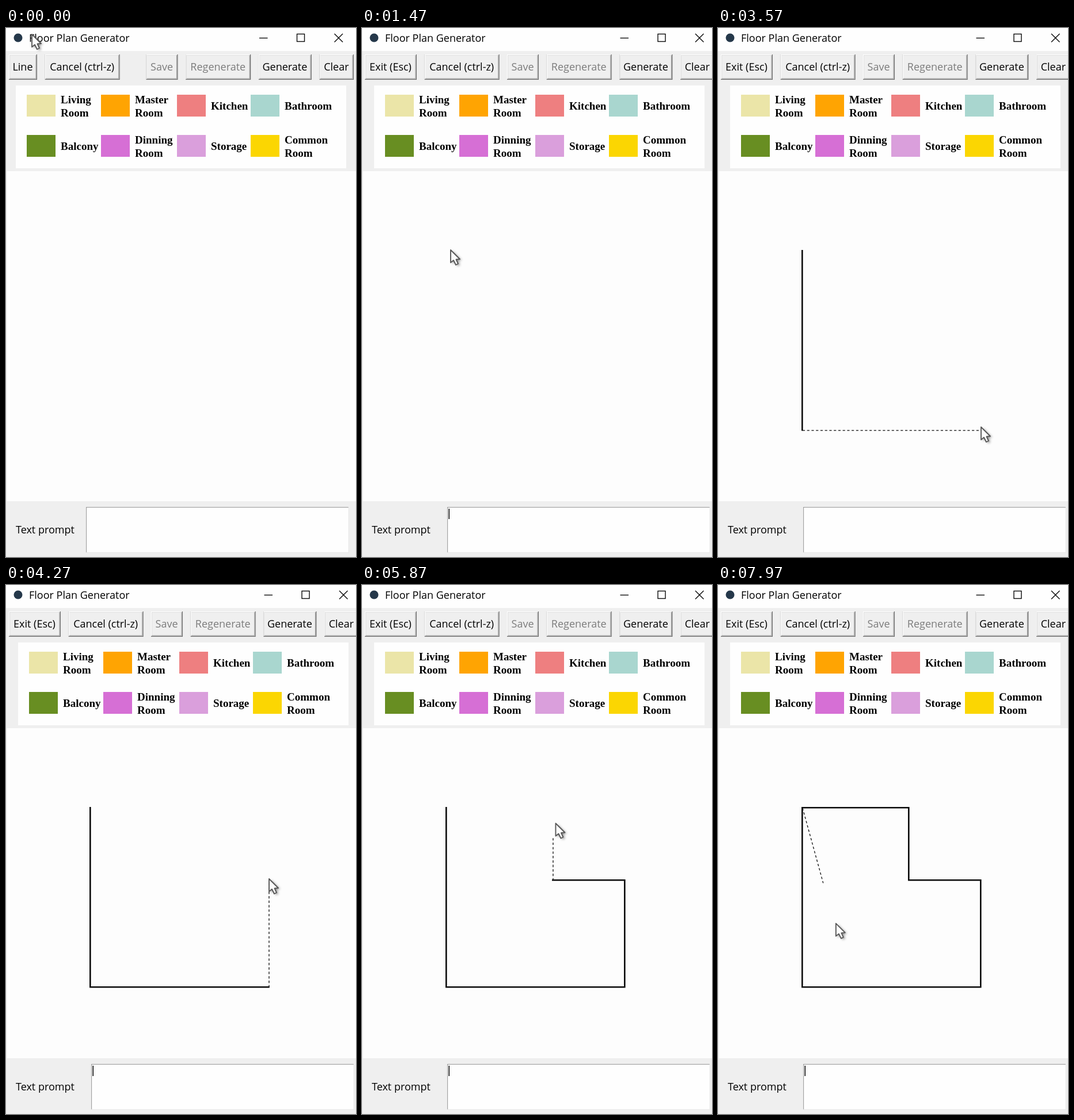
Animation of 608x920 px, one loop 8000 ms. Source, as an HTML page with a canvas:

```html
<!DOCTYPE html>
<html lang="en">
<head>
<meta charset="utf-8">
<title>Floor Plan Generator</title>
<style>
html, body { margin: 0; width: 100%; height: 100%; overflow: hidden; background: #efefef; }
canvas { display: block; }
</style>
</head>
<body>
<canvas id="stage" width="608" height="920"></canvas>
<script>
const ctx = document.getElementById('stage').getContext('2d');
const LOOP = 8000;
const PEN_LAG = 105;
const CLICK_DELAY = 230;
const PX = 1.29;
const UI = '18px "Open Sans", "Noto Sans", sans-serif';
const SERIF = 'bold 19px "Liberation Serif", "Noto Serif", serif';

const HOME = { x: 44, y: 10 };
const move = (start, end, x, y) => ({ start, end, x, y });
const MOVES = [
  move(150, 800, 28, 70),
  move(1050, 1440, 153, 385),
  move(1780, 2540, 163, 689),
  move(2850, 3430, 456, 693),
  move(3750, 4200, 456, 510),
  move(4500, 4900, 351, 506),
  move(5350, 6100, 331, 387),
  move(6614, 6924, 144, 397),
  move(7629, 8079, 214, 620)
];
// Every arrival is followed by a click: first the Line button, then the corners.
const [LINE_MODE_AT, ...CLICKS] = MOVES.map(m => m.end + CLICK_DELAY);

const [LEFT, NOTCH_X, RIGHT] = [146, 331, 456];
const [TOP, NOTCH_Y, BOTTOM] = [387, 513, 699];
const WALLS = [
  [LEFT, TOP], [LEFT, BOTTOM], [RIGHT, BOTTOM], [RIGHT, NOTCH_Y],
  [NOTCH_X, NOTCH_Y], [NOTCH_X, TOP], [LEFT, TOP]
];

const COLUMNS = [36, 165, 297, 425];
const ROOMS = {
  'Living Room': '#ebe5a8', 'Master Room': '#ffa402', 'Kitchen': '#ee7f80', 'Bathroom': '#a9d6cf',
  'Balcony': '#688e22', 'Dinning Room': '#d66fd5', 'Storage': '#da9fdc', 'Common Room': '#fbd602'
};

function rect(x, y, w, h, color) {
  ctx.fillStyle = color;
  ctx.fillRect(x, y, w, h);
}

function text(str, x, y, font = UI, color = '#000') {
  ctx.font = font;
  ctx.fillStyle = color;
  ctx.fillText(str, x, y);
}

function trace(points, width, dash = []) {
  ctx.strokeStyle = '#0a0a0a';
  ctx.lineWidth = width;
  ctx.setLineDash(dash);
  ctx.beginPath();
  points.forEach(([x, y]) => ctx.lineTo(x, y));
  ctx.stroke();
  ctx.setLineDash([]);
}

function pointerAt(t) {
  let { x, y } = HOME;
  for (const m of MOVES) {
    const u = Math.min(1, Math.max(0, (t - m.start) / (m.end - m.start)));
    const s = u * u * (3 - 2 * u);
    x += (m.x - x) * s;
    y += (m.y - y) * s;
  }
  return [x, y];
}

function titleBar(shift) {
  rect(0, 0, 608, 40, '#fefefe');
  ctx.fillStyle = '#25384a';
  ctx.beginPath();
  ctx.arc(21, 17, 7.5, 0, Math.PI * 2);
  ctx.fill();
  text('Floor Plan Generator', 40, 24);

  const [min, max, close] = [440, 505.5, 570.5].map(x => x + shift);
  trace([[min, 17.5], [min + 14.5, 17.5]], 1.4);
  ctx.strokeRect(max, 10.5, 13, 13);
  trace([[close, 10], [close + 14.5, 24.5]], 1.4);
  trace([[close + 14.5, 10], [close, 24.5]], 1.4);
}

function button(label, x, w, color) {
  const y = 46, h = 44;
  rect(x, y, w, h, '#6b6b6b');
  rect(x, y, w - PX, h - PX, '#fff');
  rect(x + PX, y + PX, w - 2 * PX, h - 2 * PX, '#a2a2a2');
  rect(x + PX, y + PX, w - 3 * PX, h - 3 * PX, '#efefef');
  ctx.textAlign = 'center';
  text(label, x + w / 2 - 0.5, 74, UI, color);
  ctx.textAlign = 'left';
}

function toolbar(lineMode, shift) {
  const gap = 13.7, grey = '#7c7c7c';
  const firstWidth = lineMode ? 90 : 49;
  button(lineMode ? 'Exit (Esc)' : 'Line', 5, firstWidth);
  button('Cancel (ctrl-z)', 5 + firstWidth + gap, 130);
  let x = 243.5 + shift;
  for (const [label, w, color] of [['Save', 55, grey], ['Regenerate', 113, grey], ['Generate', 92], ['Clear', 59.5]]) {
    button(label, x, w, color);
    x += w + gap;
  }
}

function legend(shift) {
  rect(17 + shift, 100, 574, 144, '#fefefe');
  Object.entries(ROOMS).forEach(([name, color], i) => {
    const x = COLUMNS[i % 4] + shift;
    const y = 116 + 70 * Math.floor(i / 4);
    const lines = name.split(' ');
    rect(x, y, 50, 38, color);
    lines.forEach((line, k) => text(line, x + 59, y + 26 + 23 * (k - (lines.length - 1) / 2), SERIF));
  });
}

function promptBox(x, t) {
  const y = 833, w = 457, h = 80;
  text('Text prompt', 17, 879);
  rect(x, y, w, h, '#e9e9e9');
  rect(x, y, w - PX, PX, '#a0a0a0');
  rect(x, y, PX, h - PX, '#a0a0a0');
  rect(x + PX, y + PX, w - 2 * PX, h - 2 * PX, '#fefefe');
  const focused = t - LINE_MODE_AT - 40;
  if (focused >= 0 && focused % 920 < 615) rect(x + 2.5, y + 3, 1.5, 18, '#000');
}

function plan(t) {
  const corner = CLICKS.filter(c => c <= t).length - 1;
  if (corner < 0) return;
  ctx.save();
  ctx.translate(0.3, 0.3);
  ctx.lineCap = 'square';
  if (corner > 0) trace(WALLS.slice(0, corner + 1), 2 * PX);
  ctx.lineCap = 'butt';

  const [ax, ay] = WALLS[corner];
  let [x, y] = pointerAt(t - PEN_LAG);
  // Walls snap to the nearer axis until the outline is closed.
  if (corner < WALLS.length - 1) {
    if (Math.abs(x - ax) > Math.abs(y - ay)) y = ay;
    else x = ax;
  }
  ctx.translate(PX / 2, PX / 2);
  trace([[ax, ay], [x, y]], PX, [3.2 * PX, 2.8 * PX]);
  ctx.restore();
}

function pointer(t) {
  const [x, y] = pointerAt(t);
  ctx.save();
  ctx.translate(x + 1, y + 1);
  ctx.beginPath();
  for (const [px, py] of [[0, 0], [0, 22], [5, 18], [9, 26], [13, 24], [9.5, 16.5], [16, 16]]) ctx.lineTo(px, py);
  ctx.closePath();
  ctx.shadowColor = 'rgba(0,0,0,.45)';
  ctx.shadowBlur = 4;
  ctx.shadowOffsetX = 3;
  ctx.shadowOffsetY = 2;
  ctx.fillStyle = '#fdfdfd';
  ctx.fill();
  ctx.shadowColor = 'transparent';
  ctx.lineJoin = 'round';
  ctx.lineWidth = 1.9;
  ctx.strokeStyle = '#585858';
  ctx.stroke();
  ctx.restore();
}

function draw(t) {
  const lineMode = t >= LINE_MODE_AT;
  const shift = lineMode ? 8.5 : 0; // the longer label widens the window
  rect(0, 0, 608, 920, '#efefef');
  titleBar(shift);
  toolbar(lineMode, shift);
  legend(Math.floor(shift / 2));
  rect(1.5, 249, 606.5, 574, '#fdfdfd');
  promptBox(139 + Math.round(shift), t);
  plan(t);
  pointer(t);
}

const start = performance.now();
function tick() {
  draw((performance.now() - start) % LOOP);
  requestAnimationFrame(tick);
}
tick();
</script>
</body>
</html>
```
